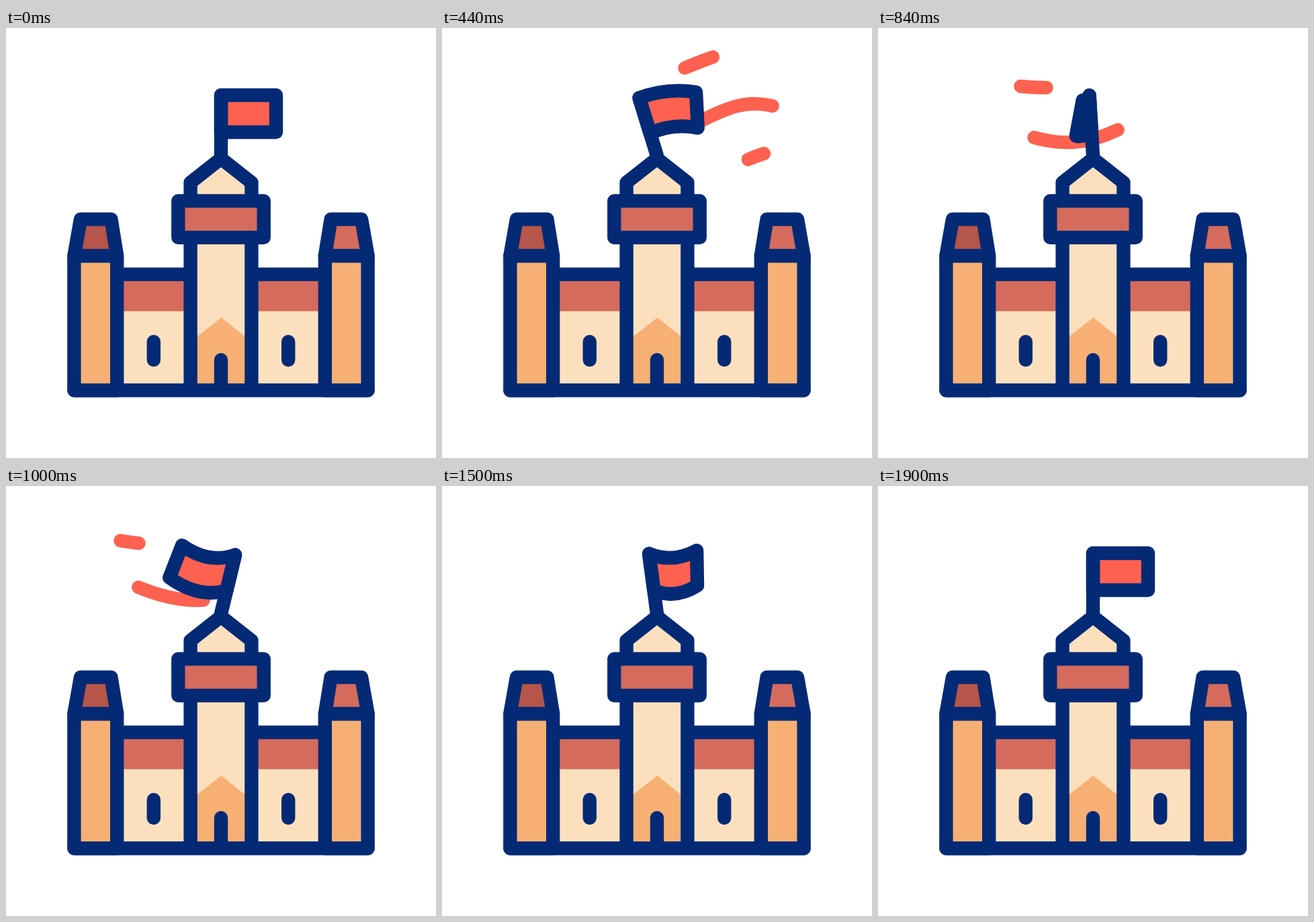
These frames come from a looping animation (640x640 px, 2.4 s). An HTML page:

```html
<!DOCTYPE html>
<html lang="en">
<head>
<meta charset="utf-8">
<title>Castle in the wind</title>
<style>
  html, body { margin: 0; width: 100%; height: 100%; overflow: hidden; background: #fff; }
  svg { display: block; width: 100vw; height: 100vh; }
  .line, .wind { stroke-width: 20.4; stroke-linecap: round; stroke-linejoin: round; fill: none; }
  .line { stroke: #042a76; }
  .wind { stroke: #ff6150; stroke-width: 20; }
  .red { fill: #ff6150; }
  .roof { fill: #d56b5d; }
  .cream { fill: #fce0be; }
  .sand { fill: #f6b074; }
  .cap { fill: currentColor; }
  .left { color: #b65549; }
  .right { color: #d56b5d; }
</style>
</head>
<body>
<svg viewBox="0 0 640 640">
  <defs>
    <g id="wing">
      <path class="cream" d="M165 367H275V539H165Z"/>
      <path class="roof" d="M165 367H275V421.5H165Z"/>
      <path class="line" d="M165 366.6H275M219.800 467V494"/>
      <path class="line sand" d="M101.400 339H165.200V539.200H101.400Z"/>
      <path class="line cap" d="M111 284.600H156.400L165.200 339H101.400Z"/>
    </g>
  </defs>

  <path class="wind" pathLength="1" data-start="160" data-span="1010" data-lag="112"
        d="M462 32C405 32 350 70 292 85C245 94 195 85 149 78"/>
  <path class="wind" pathLength="1" data-start="142" data-span="970" data-lag="338"
        d="M492 116C440 103 405 131 356 152C297 180 250 174 186 146"/>
  <path class="wind" pathLength="1" data-start="220" data-span="500" data-lag="70"
        d="M528 180C490 178 450 195 398 226"/>

  <path id="flag" class="line red"/>
  <path id="pole" class="line"/>

  <use href="#wing" class="left"/>
  <use href="#wing" class="right" transform="matrix(-1 0 0 1 640 0)"/>

  <path class="cream" d="M274.600 312H365.400V539H274.600Z"/>
  <path class="sand" d="M274.600 467L320.500 431L365.400 467V539H274.600Z"/>
  <path class="line" d="M320 494V539M274.600 312V539.200M365.400 312V539.200M101.400 539.200H538.600"/>
  <path class="line cream" d="M274.600 257V230L320 194.200L365.400 230V257"/>
  <path class="line roof" d="M256.300 257.400H383.700V311.900H256.300Z"/>
</svg>
<script>
const LOOP = 2400, STEP = 20;
const BASE = { x: 320, y: 190 }, POLE = 90, HEIGHT = 55, WIDTH = 82;

// lean: pole angle, reach and lift: outer edge offset,
// tip: outer edge angle, bend: bulge of the long edges.
const rest = { lean: 0, reach: WIDTH, lift: 0, tip: 0, bend: 0 };
const poses = [
  { at: 210, ...rest },
  { at: 600, lean: -27, reach: 86, lift: -12, tip: -4.5, bend: -18 },
  { at: 1040, lean: 14.5, reach: -83, lift: -15, tip: 22, bend: 22 },
  { at: 1500, lean: -7.6, reach: 71, lift: -8, tip: -1, bend: 17 },
  { at: 1900, ...rest }
];

const clamp = u => Math.min(1, Math.max(0, u));
const smooth = u => u * u * (3 - 2 * u);
const glide = u => u + 0.87 * u * u * (1 - u);

function poseAt(t) {
  const i = Math.max(1, poses.findIndex(p => p.at > t));
  const [a, b] = t >= poses.at(-1).at ? poses.slice(-2) : [poses[i - 1], poses[i]];
  const s = smooth(clamp((t - a.at) / (b.at - a.at)));
  return Object.fromEntries(Object.keys(rest).map(k => [k, a[k] + (b[k] - a[k]) * s]));
}

// Point at a distance from p, straight down when the angle is zero.
function down(p, degrees, distance) {
  const r = degrees * Math.PI / 180;
  return { x: p.x - Math.sin(r) * distance, y: p.y + Math.cos(r) * distance };
}

const xy = p => p.x.toFixed(2) + ' ' + p.y.toFixed(2);
const bulge = (a, b, bend) => xy({ x: (a.x + b.x) / 2, y: (a.y + b.y) / 2 + bend });

const flag = document.getElementById('flag');
const pole = document.getElementById('pole');
const gusts = document.querySelectorAll('.wind');

function drawFlag(t) {
  const { lean, reach, lift, tip, bend } = poseAt(t);
  const top = down(BASE, lean, -POLE);
  const joint = down(top, lean, HEIGHT);
  // The outer edge sinks as the flag turns edge-on.
  const droop = 24 * (1 - Math.abs(reach) / WIDTH);
  const outer = { x: top.x + reach, y: top.y + lift + droop };
  const corner = down(outer, tip, HEIGHT - Math.abs(bend) / 6);
  flag.setAttribute('d', `M${xy(top)}Q${bulge(top, outer, bend)} ${xy(outer)}` +
    `L${xy(corner)}Q${bulge(corner, joint, bend)} ${xy(joint)}Z`);
  pole.setAttribute('d', `M${xy(BASE)}L${xy(top)}`);
}

// The tail of a gust follows its head after a fixed lag.
function drawGust(path, t) {
  const { start, span, lag } = path.dataset;
  const along = time => glide(clamp((time - start) / span));
  const head = along(t), tail = along(t - lag);
  path.style.visibility = head - tail < 0.002 ? 'hidden' : 'visible';
  path.style.strokeDasharray = `${head - tail} 2`;
  path.style.strokeDashoffset = -tail;
}

function draw(t) {
  drawFlag(t);
  gusts.forEach(g => drawGust(g, t));
}

let start;
function frame(now) {
  start ??= now;
  draw(Math.floor((now - start) % LOOP / STEP) * STEP);
  requestAnimationFrame(frame);
}
draw(0);
requestAnimationFrame(frame);
</script>
</body>
</html>
```
